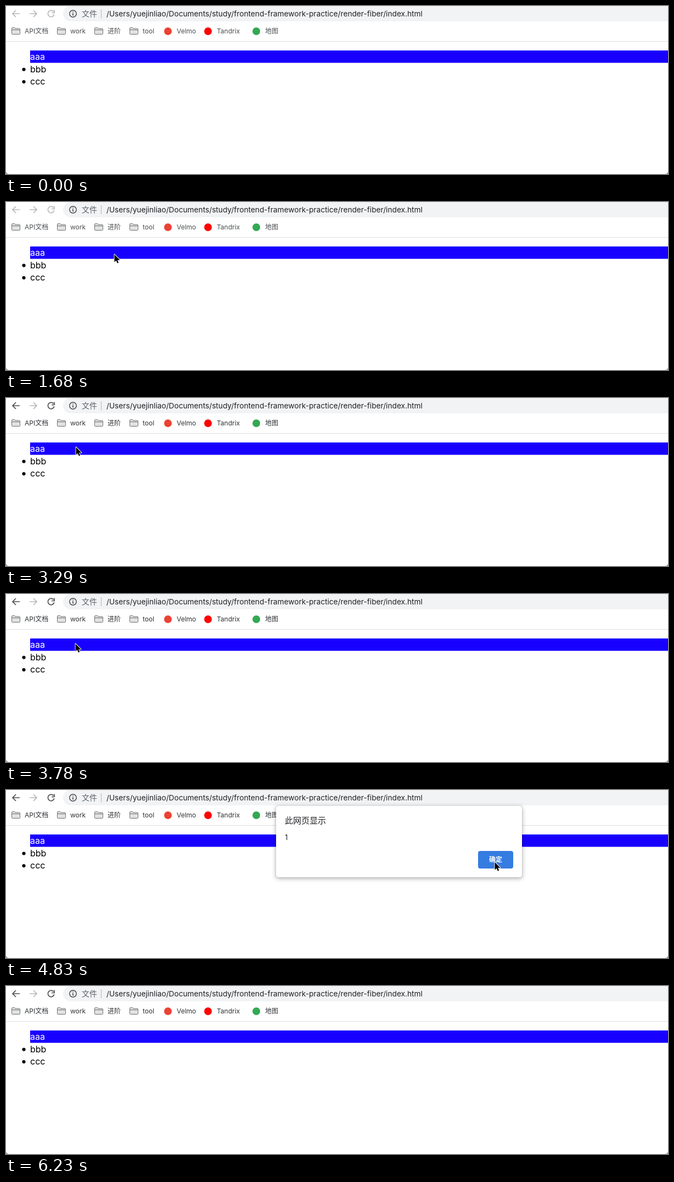
These frames come from a looping animation (1206x306 px, 7 s). An HTML page:

```html
<!DOCTYPE html>
<html lang="zh">
<head>
<meta charset="utf-8">
<title>render-fiber</title>
<style>
html, body { margin: 0; width: 100%; height: 100%; overflow: hidden; background: #8a8a8a; }
body { font-family: Inter, "Noto Sans CJK SC", "Noto Sans CJK", sans-serif; }
svg { position: absolute; left: 0; top: 0; display: block; }
#page { background: #fff; border-radius: 0 0 5px 5px; }
.icon { fill: none; stroke: #4c4f53; stroke-width: 1.7; }
.off, .idle .nav { stroke: #b6b8bb; }
.marks { font-size: 12px; fill: #303236; }
.idle .marks { fill: #4b4e52; }
.list { font-size: 16px; }
#dialog {
  position: absolute; left: 492px; top: 28.5px; width: 448px; height: 130.5px;
  background: #fff; border-radius: 4px; color: #202124;
  box-shadow: 0 0 1px #0008, 0 2px 8px #0005; transform-origin: 50% 100%;
}
#dialog > * { position: absolute; left: 16px; line-height: 20px; }
#dialog .title { top: 17.5px; font-size: 15px; }
#dialog .message { top: 47.5px; font-size: 13px; }
#dialog .ok {
  left: 368px; top: 82.5px; width: 64px; line-height: 32px; border-radius: 4px;
  text-align: center; font-size: 12px; font-weight: 700; color: #fff;
}
</style>
</head>
<body>
<svg id="page" width="1206" height="306">
  <rect x="104" width="1130" height="28" rx="14" fill="#f1f3f4"/>
  <path class="icon nav" d="M25 14H12.5M18 8l-6 6 6 6"/>
  <path class="icon off" d="M43 14h12.500M50 8l6 6-6 6"/>
  <path class="icon nav" d="M86.600 10.200A5.800 5.800 0 1 0 87.800 15.200M88 7.500v5h-5"/>
  <circle class="icon" cx="122" cy="14" r="6.200" style="stroke-width:1.500"/>
  <path class="icon" d="M122 10v1.600M122 13v4.500"/>
  <text x="138" y="19" font-size="14" fill="#5f6368">文件</text>
  <path d="M173.500 6v16" stroke="#b4b7ba"/>
  <text x="183" y="19" font-size="13.700" fill="#202124">/Users/yuejinliao/Documents/study/frontend-framework-practice/render-fiber/index.html</text>

  <defs>
    <g id="folder" stroke="#6c6e71" fill="#e2e2e2">
      <path d="M.5 11.500v-9.500q0-1.500 1.500-1.500h3.500l1.500 1.500h7q1.500 0 1.500 1.500v8q0 1-1 1h-13q-1 0-1-1z"/>
      <path d="M.5 4.500h15"/>
    </g>
  </defs>
  <use href="#folder" x="10" y="39"/>
  <use href="#folder" x="93" y="39"/>
  <use href="#folder" x="161" y="39"/>
  <use href="#folder" x="225" y="39"/>
  <circle cx="295" cy="46" r="7" fill="#ea4335"/>
  <circle cx="368" cy="46" r="7" fill="#f00"/>
  <circle cx="456" cy="46" r="7" fill="#34a853"/>
  <g class="marks">
    <text x="34" y="50">API文档</text>
    <text x="117" y="50">work</text>
    <text x="185" y="50">进阶</text>
    <text x="249" y="50">tool</text>
    <text x="311" y="50">Velmo</text>
    <text x="384" y="50">Tandrix</text>
    <text x="472" y="50">地图</text>
  </g>
  <path d="M0 64.500h1206" stroke="#dcdee0"/>

  <rect x="44" y="81" width="1162" height="22.500" fill="#1800ff"/>
  <circle cx="32.500" cy="115.500" r="3.100"/>
  <circle cx="32.500" cy="138" r="3.100"/>
  <g class="list">
    <text x="44" y="98" fill="#fff">aaa</text>
    <text x="44" y="120.700">bbb</text>
    <text x="44" y="143">ccc</text>
  </g>
</svg>

<div id="dialog">
  <div class="title">此网页显示</div>
  <div class="message">1</div>
  <div class="ok">确定</div>
</div>

<svg width="1206" height="306">
  <g id="cursor" stroke-linejoin="round">
    <path id="arrow" d="M.5 .5v14l3.200-3 2.200 5 2.300-1-2.200-4.800h4.500z" stroke="#fff" stroke-width="1.800" paint-order="stroke"/>
    <path id="hand" d="M-1.500 1q1.500-2 3 0l1 5 1.500-.5 1 .8 1.500-.3 1 1 1 .2q1 4-1 7v2.300h-7q-1-3-5-7.500 1-2 3.500.5z" fill="#fff" stroke="#000"/>
  </g>
</svg>

<script>
const LOOP = 7000, STEP = 70;
const $ = id => document.getElementById(id);
const page = $("page"), dialog = $("dialog"), cursor = $("cursor");
const button = dialog.querySelector(".ok");

// Pointer path: time, x, y
const path = [
  [350, 579, 298], [490, 552, 263], [630, 552, 263], [840, 500, 215],
  [1120, 290, 125], [1330, 212, 100], [1400, 212, 100], [1680, 197, 95],
  [1890, 160, 97], [2100, 160, 97], [2450, 130, 95], [2730, 127, 89],
  [3360, 127, 89], [3500, 126, 90], [4060, 126, 90], [4270, 250, 118],
  [4550, 690, 158], [4830, 890, 131], [5110, 881, 127], [5600, 881, 126],
  [6160, 850, 211]
];

const clamp = v => Math.min(1, Math.max(0, v));
const show = (el, on) => el.style.display = on ? "" : "none";

function pointerAt(t) {
  const i = Math.max(1, path.findIndex(p => p[0] >= t));
  const [t0, x0, y0] = path[i - 1], [t1, x1, y1] = path[i];
  const k = clamp((t - t0) / (t1 - t0));
  return [x0 + (x1 - x0) * k, y0 + (y1 - y0) * k];
}

function drawDialog(t) {
  const enter = clamp((t - 3795) / 100), leave = clamp((t - 5665) / 140);
  show(dialog, enter > 0 && leave < 1);
  dialog.style.opacity = enter * (1 - leave);
  // Tilts backwards and rises while fading out
  dialog.style.transform = leave
    ? `translateY(${-20 * leave}px) matrix3d(1,0,0,0, 0,${1 + .06 * leave},0,${-.00053 * leave}, 0,0,1,0, 0,0,0,1)`
    : enter < 1 ? `scale(${.9 + .1 * enter})` : "none";
  button.style.background = t < 4760 ? "#1a73e8" : "#357ce1";
}

function draw(now) {
  const t = Math.floor(now % LOOP / STEP) * STEP;
  page.classList.toggle("idle", t < 1820);
  drawDialog(t);
  const visible = t >= 350 && t <= 6160, pointing = t >= 2310 && t < 2660;
  show(cursor, visible);
  show($("hand"), pointing);
  show($("arrow"), !pointing);
  if (visible) cursor.setAttribute("transform", `translate(${pointerAt(t)})`);
}

let start;
function tick(now) {
  start ??= now;
  draw(now - start);
  requestAnimationFrame(tick);
}
draw(0);
requestAnimationFrame(tick);
</script>
</body>
</html>
```
